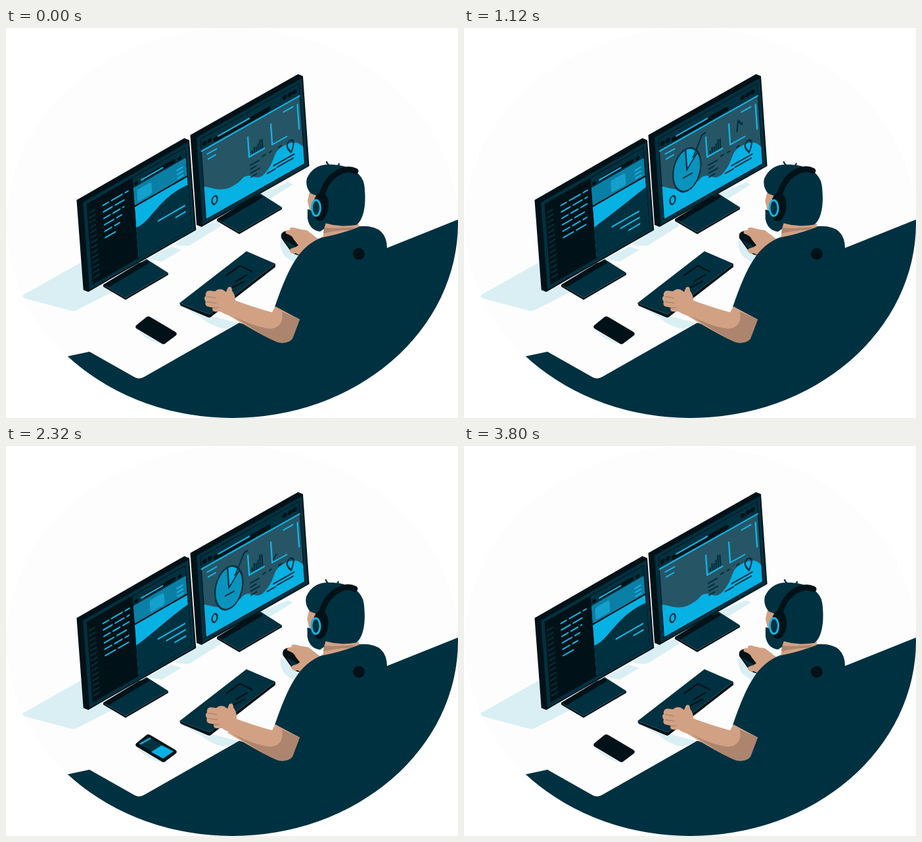
These frames come from a looping animation (688 by 594 pixels, 3.84 s). An HTML page:

```html
<!DOCTYPE html>
<html lang="en">
<head>
<meta charset="utf-8">
<title>Developer at a desk</title>
<style>
html,body{margin:0;width:100%;height:100%;overflow:hidden;background:#fff}
svg{display:block;width:688px;height:594px}
.navy{fill:#003140}.black{fill:#001217}.cyan{fill:#06b1e3}.teal{fill:#0a7fa5}
.shadow{fill:#d9eff4}.skin{fill:#d2a184}.shade{fill:#ad856e}
.line{fill:none;stroke-linecap:round;stroke-linejoin:round;stroke-width:2.3}
.lc{stroke:#14b2e0}.lb{stroke:#001217}.ln{stroke:#003140}.ls{stroke:#ad856e;stroke-width:1.4}
</style>
</head>
<body>
<svg viewBox="0 0 688 594">
<defs>
<clipPath id="round"><ellipse cx="344.5" cy="297" rx="343.5" ry="297"/></clipPath>
<clipPath id="page"><path d="M77 8H157V129H77Z"/></clipPath>
<g id="stand">
<path class="black" d="M0 0L34 20L99 -18V-15L34 23L0 3Z"/>
<path class="navy" d="M0 0L66 -39L99 -18L34 20Z"/>
<path class="black" d="M0 0L54 -33L68 -37L70 -33L8 4Z"/>
</g>
<g id="case">
<path class="black" d="M-7 -7H157L164 0V137H0L-7 130Z"/>
<path class="navy" d="M2 2H162V135H2Z"/>
<path class="black" d="M7 7H158V130H7Z"/>
</g>
</defs>

<ellipse cx="344.5" cy="297" rx="343.5" ry="297" fill="#fdfdfd"/>
<g class="shadow">
<path d="M27 406L114 357L120 400L148 392L166 400L107 430Q103 432 97 430L29 412Q23 409 27 406Z"/>
<path d="M214 352L252 333L267 338L237 356ZM257 330L291 303L322 294L328 301L280 331Q275 333 257 330Z"/>
<path d="M385 254L429 235L437 238L402 260ZM418 322Q416 338 425 348L441 359L452 346Z"/>
<path d="M261 421L310 438L357 450L333 458Q312 455 296 440ZM197 458L239 482Q220 480 197 458Z"/>
</g>
<path class="navy" clip-path="url(#round)" d="M80 503L127 493L196 532Q203 536 211 531L355 449L430 470L480 390L580 335L700 287V600H80Z"/>

<!-- editor monitor -->
<use href="#stand" x="148" y="391"/>
<g transform="matrix(1 -.575 .075 1 115 265)">
<use href="#case"/>
<g id="numbers" class="line ln"></g>
<g id="code" class="line lc"></g>
<g clip-path="url(#page)">
<path class="navy" d="M77 8H157V129H77Z"/>
<path class="line lb" style="stroke-width:6" d="M96 18H139M82 18.500h.1M148 18.500h.1"/>
<path class="line lc" d="M90 18H122"/>
<path class="teal" d="M77 23H157V51H77Z"/>
<rect id="card" x="82" y="29" width="22" height="18" rx="3" fill="#14a0cc"/>
<path class="line lc" d="M143 34h8M143 40h8M143 46h8"/>
<path class="cyan" d="M77 51H157V129H77Z"/>
<path id="hill" class="navy"/>
<path class="line lb" d="M77 51H157"/>
<path id="notes" class="line lc"/>
</g>
</g>

<!-- chart monitor -->
<use href="#stand" x="321" y="291"/>
<g transform="matrix(1 -.565 .07 1 288 166)">
<use href="#case"/>
<path class="navy" d="M8 8H157V26H8Z"/>
<path class="line lb" style="stroke-width:7" d="M30 20H110M13 17h.1M21 17h.1M135 16h.1M143 16h.1M150 16h.1"/>
<path class="line lc" d="M34 17.500H81"/>
<path fill="#265566" d="M8 26H157V129H8Z"/>
<path class="cyan" d="M8 80C20 88 32 103 50 103S62 97 72 100S86 118 100 110S112 89 122 87S148 86 157 104V129H8Z"/>
<path class="line lc" d="M8 26H157M16 35h14M17 43h11M132 36.500h14M153 37V74M77 44V74H100M112 44V75H134"/>
<path id="list" class="line ln"/>
<path class="line ln" d="M97 84h4M107 84h3M121 84h4M112 107H143M102 113h12M117 112H141"/>
<path class="line ln" d="M139 102Q132 91 134 87Q138 80 143 87Q145 91 139 102Z"/>
<ellipse class="line ln" cx="22" cy="108.500" rx="4" ry="6"/>
<path id="bars" class="line ln" style="stroke-linecap:butt"/>
<path id="trace" class="line ln" pathLength="1" d="M114 71L119 66Q123 65 123 62L126 46L131 55L134 47"/>
<g id="pie">
<ellipse cx="46" cy="76" rx="21" ry="31" fill="#0a93bd"/>
<path class="cyan" d="M46 76V45Q58 46 63 59Z"/>
<ellipse class="line ln" cx="46" cy="76" rx="21" ry="31"/>
<path class="line ln" d="M46 45V76L63 59M56 62L64 60M40 85h13"/>
</g>
<path id="call" class="line ln" pathLength="1" d="M57 62L72 37H77"/>
</g>

<!-- keyboard and phone -->
<path class="black" d="M264 419L310 436L410 359V364L312 440Q310 442 306 440L266 423Z"/>
<path class="navy" d="M264 419L366 340L410 359L310 436Z"/>
<path class="line lb" d="M335 377L356 362L374 371M350 386L367 376M345 395L363 386"/>
<path class="black" d="M198 453L214 440Q217 438 221 441L258 463Q261 465 259 468L243 480Q240 483 236 480L199 458Q196 456 198 453Z"/>
<g id="phone">
<path class="navy" d="M201 453L217 443L255 465L239 476Z"/>
<path class="cyan" d="M221 466L237 456L255 465L239 476Z"/>
<path id="alert" class="line lc" style="stroke-linecap:butt" d="M204 454L220 445"/>
</g>

<!-- mouse and right hand -->
<g id="mouse">
<path class="black" d="M419 320Q417 311 426 309L450 328L453 346Q442 348 434 341Z"/>
<path class="navy" d="M424 323L445 335L447 343Q441 344 436 340Z"/>
<path class="skin" d="M426 313Q424 307 432 308Q431 303 438 304Q448 307 458 308L476 322L454 345Q448 348 441 343Q435 345 432 340Q430 336 440 334L445 331L438 322Q436 316 426 313Z"/>
</g>

<!-- person -->
<path class="navy" d="M409 425Q426 375 440 354Q456 328 483 318Q515 312 538 302Q580 299 580 336L582 440L440 500L432 470L447 444Z"/>
<circle class="black" cx="537" cy="344" r="9"/>
<path class="skin" d="M482 319Q486 307 484 296L537 298V303Q512 313 482 319Z"/>
<path class="shade" d="M484 304Q500 306 531 303L524 308Q505 307 483 313Z"/>
<g id="head">
<path class="skin" d="M463 246L459 263L463 282L480 290L479 250Z"/>
<path class="navy" d="M459 276Q465 277 469 282L490 287L484 306L478 310Q462 308 459 290Z"/>
<path class="navy" d="M464 252Q455 242 458 229Q468 207 493 208C522 208 546 220 546 246C548 268 545 292 533 300Q509 304 485 297L477 257Z"/>
<path class="line ln" d="M495 211Q490 209 488 204M505 211L507 207M532 231Q537 237 543 234"/>
<path class="line lb" style="stroke-width:9" d="M480 257Q487 230 506 220Q520 212 532 218"/>
<ellipse class="black" cx="479" cy="272" rx="12" ry="22" transform="rotate(5 479 272)"/>
<ellipse class="navy" cx="472" cy="274" rx="6.500" ry="12" stroke="#14b2e0" stroke-width="3"/>
</g>

<!-- left arm and hand -->
<path class="skin" d="M341 412Q375 425 405 433L410 424L447 444L436 473Q430 481 415 479Q395 472 338 437Z"/>
<path class="shade" d="M344 437Q375 455 402 458Q424 456 420 432L447 444L436 473Q430 481 415 479Q395 472 344 437Z"/>
<g id="hand">
<path class="skin" d="M304 408Q303 400 310 400L318 401Q326 394 335 402L338 395Q344 392 344 400Q350 408 349 417L350 440Q335 438 327 432L318 432Q312 430 315 426L306 424Q302 421 304 417Q300 411 304 408Z"/>
<path class="line ls" d="M306 409L319 411M306 417L320 419M315 426L323 426"/>
</g>
</svg>
<script>
const LOOP = 3840, HALF = LOOP / 2, STEP = 40;
const $ = id => document.getElementById(id);
const set = (id, name, value) => $(id).setAttribute(name, value);
const show = (id, on) => set(id, "visibility", on ? "visible" : "hidden");
const mix = (a, b, p) => a + (b - a) * p;
const span = (t, start, len) => Math.min(1, Math.max(0, (t - start) / len));
const ease = p => p * p * (3 - 2 * p);
// Eases in at one time and back out at another
const pulse = (t, on, off, len) => ease(span(t, on, len)) - ease(span(t, off, len));
const rows = (n, draw) => Array.from({ length: n }, (_, i) => draw(i)).join("");

$("numbers").innerHTML = `<path d="${rows(14, i => `M10 ${22 + i * 7.6}h8`)}"/>`;
set("list", "d", rows(4, i => `M78 ${87 + i * 6}h${i % 2 ? 8 : 13}`));
$("code").innerHTML = rows(6, i =>
  `<path stroke-dasharray="${8 + i * 5 % 9} 5 ${16 - i * 3 % 7} 5"/>`);

function drawEditor(t, h) {
  const slide = pulse(h, 200, 1420, 280);
  const late = pulse(h, 400, 1400, 340);
  const grow = pulse(t, 200, 3000, 400);

  // Rows are typed one after another, then shortened again
  [...$("code").children].forEach((row, i) => {
    const typed = pulse(t, 100 + i * 120, 3000 + i * 60, 500);
    row.setAttribute("d", `M31 ${23 + i * 9.8}h${mix(38 - i * 4, 40 - i, typed)}`);
  });

  set("card", "x", 82 + 24 * slide);
  set("hill", "d", `M77 83C${mix(99, 104, slide)} ${mix(88, 78, slide)} ` +
    `${mix(112, 130, slide)} ${mix(58, 73, slide)} 158 ${mix(64, 67, slide)}V129H77Z`);
  set("notes", "d", rows(3, i => {
    const w = (40 - i * 12) * (i ? mix(i == 1 ? .5 : 0, 1, grow) : 1);
    return w ? `M${150 - 6.5 * late} ${92 + i * 9.5 + 5 * late}h${-w}` : "";
  }));
}

function drawCharts(t, h) {
  const pie = pulse(t, 80, 3120, 340);
  set("pie", "transform", `translate(46 76) scale(${pie}) translate(-46 -76)`);
  show("pie", pie > 0);

  const call = pulse(t, 440, 2480, 600);
  set("call", "stroke-dasharray", `${call} 2`);
  show("call", call > 0);

  const lift = pulse(h, 1300, 1800, 300) + pulse(h, 200, 500, 200);
  set("bars", "d", rows(6, i =>
    `M${82 + i * 3.1} 72v${-(5 + i * 2 + 2 * Math.sin(i * 2)) * (1 + .3 * lift)}`));

  const head = span(h, 260, 1000), tail = span(h, 820, 1030);
  set("trace", "stroke-dasharray", `0 ${tail} ${head - tail} 2`);
  show("trace", head > tail);
}

function drawDesk(t, h) {
  show("phone", t >= 1680 && t < 3440);
  $("alert").style.strokeWidth = 2.4 + 3.6 * pulse(t, 1680, 1960, 120);

  const sway = pulse(h, 100, 800, 340);
  set("mouse", "transform", `translate(${2.5 * sway} ${-1.5 * sway})`);
  set("head", "transform", `rotate(${-.7 * pulse(t, 80, 2400, 400)} 490 310)`);
  const tap = pulse(h, 300, 520, 80);
  set("hand", "transform", `translate(${2 * tap} ${-2 * tap})`);
}

function frame() {
  const t = Math.floor(performance.now() % LOOP / STEP) * STEP;
  const h = t % HALF;
  drawEditor(t, h);
  drawCharts(t, h);
  drawDesk(t, h);
  requestAnimationFrame(frame);
}
frame();
</script>
</body>
</html>
```
